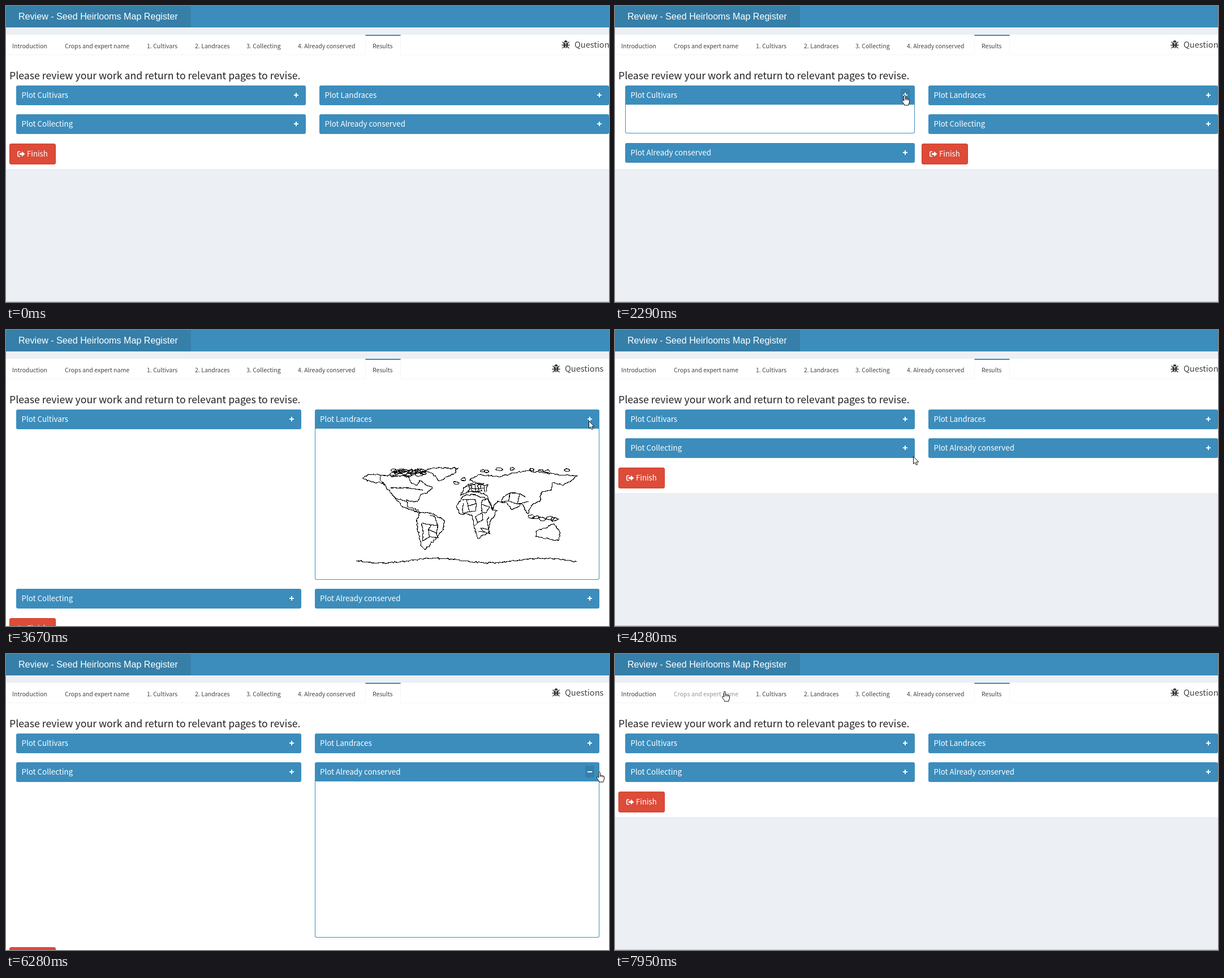
Write an HTML page that moves like this. It is 1066 by 525 pixels and loops after 8000 ms.

```html
<!DOCTYPE html>
<html lang="en">
<head>
<meta charset="utf-8">
<title>Results</title>
<style>
html, body { margin: 0; width: 100%; height: 100%; overflow: hidden; }
body { background: #ecf0f5; font-family: "Noto Sans CJK JP", "Noto Sans CJK SC", "Noto Sans CJK", "Open Sans", sans-serif; }
#stage { position: relative; width: 1066px; height: 525px; overflow: hidden; background: #ecf0f5; color: #444; white-space: nowrap; }
#stage > *, .abs { position: absolute; }
.bar { left: 0; top: 0; width: 100%; height: 38px; background: #3c8dbc; }
.brand { left: 0; top: 0; width: 305px; padding-left: 22px; height: 38px; background: #367fa9; color: #fff; font: 16.1px/37px "Liberation Sans", Arial, sans-serif; }
.edge { left: 0; top: 524px; width: 100%; height: 1px; background: #b9bec3; }
#page { left: 0; top: 51px; width: 1084px; }
.content { background: #fff; padding: 90px 0 8px 6px; line-height: 0; }
.tabs { left: 0; top: 0; width: 100%; height: 35px; border-bottom: 1px solid #f4f4f4; font-size: 10.55px; line-height: 39px; }
.tab { position: absolute; top: 0; }
.active { left: 635px; top: 0; width: 61px; height: 34px; border: solid #f4f4f4; border-width: 2px 1px 0; border-top-color: #3c8dbc; background: #fff; }
.help { left: 982px; top: 0; font-size: 14.6px; line-height: 34px; }
.help svg { position: absolute; left: 0; top: 9px; }
.help span { position: absolute; left: 23px; }
h3 { left: 6px; top: 56px; margin: 0; font-size: 17.72px; font-weight: 400; line-height: 30px; color: #222; }
#row { white-space: normal; }
.col { float: left; box-sizing: border-box; width: 50%; padding: 0 12px 16px; }
.box { position: relative; background: #3c8dbc; border-radius: 3px; padding: 0 1px 1px; overflow: hidden; white-space: nowrap; }
.head { height: 34px; padding-left: 8.5px; color: #fff; font-size: 13.35px; line-height: 33px; }
.tool { position: absolute; right: 9px; top: 6px; width: 16px; height: 21px; border-radius: 2px; }
.tool.hover { background: #367fa9; }
.tool::before, .tool::after { content: ""; position: absolute; background: #fff; }
.tool::before { left: 4px; top: 10px; width: 8px; height: 2px; }
.tool::after { left: 7px; top: 7px; width: 2px; height: 8px; }
.tool.minus::after { display: none; }
.body { position: relative; height: 0; background: #fff; overflow: hidden; border-radius: 0 0 2px 2px; }
.body svg { position: absolute; left: 72px; top: 67px; overflow: visible; }
.finish { display: inline-block; position: relative; vertical-align: top; box-sizing: border-box; width: 82px; height: 37px; margin-top: 1px; padding-left: 30px; background: #dd4b39; border: 1px solid #d73925; border-radius: 3px; color: #fff; font-size: 13.2px; line-height: 34px; white-space: nowrap; }
.finish svg { position: absolute; left: 13px; top: 12px; }
#cursor { left: 0; top: 0; overflow: visible; }
</style>
</head>
<body>
<div id="stage">
  <div class="edge"></div>
  <div class="bar"></div>
  <div class="brand">Review - Seed Heirlooms Map Register</div>
  <div id="page">
    <div class="content">
      <div class="abs tabs"></div>
      <div class="abs active"></div>
      <div class="abs tabs" id="labels" style="border-color:transparent"></div>
      <div class="abs help" id="help">
        <svg width="15" height="16" fill="#333" stroke="#333">
          <path d="M4.5 4.5a3 3.6 0 0 1 6 0z" stroke="none"/>
          <path d="M3.5 5.5h3.4v9.5q-3.500-1-3.400-9.500zM8.100 5.500h3.400q.1 8.500-3.400 9.500z" stroke="none"/>
          <path d="M.3 9.500h14.400M1.500 3.500l3 3M13.500 3.500l-3 3M1.500 15l3-3M13.500 15l-3-3" fill="none" stroke-width="1.300"/>
        </svg>
        <span>Questions</span>
      </div>
      <h3 class="abs">Please review your work and return to relevant pages to revise.</h3>
      <div id="row"><div class="finish"><svg width="14" height="11" fill="none" stroke="#fff">
        <path d="M5 1.200H2.500Q.9 1.200.9 2.800V8.200Q.9 9.800 2.500 9.800H5" stroke-width="1.600"/>
        <path d="M4 3.700h4V.8l5.500 4.700L8 10.200V7.300H4z" fill="#fff" stroke="none"/>
      </svg>Finish</div></div>
    </div>
  </div>
  <svg id="cursor" width="20" height="22" stroke="#111" fill="#fff" stroke-linejoin="round">
    <path id="arrow" d="M.5.500V13.500L3.500 10.800 5.500 15.500 7.700 14.500 5.700 10H9.800z"/>
    <g id="hand">
      <path d="M-1.300 9V1.500Q-1.300.3 0 .3T1.300 1.500V6Q3.500 5 3.800 6.700 5.800 5.800 6.200 7.400 8.500 6.800 8.500 9V12Q8.500 14 7 16V18H-.5V16.500Q-2.500 14-4.300 11.300-5 9.500-3.700 9-2.500 8.700-1.300 10.500z"/>
      <path d="M1.300 6V9M3.800 6.700V9.300M6.200 7.400V9.600" fill="none"/>
    </g>
  </svg>
</div>
<script>
const $ = id => document.getElementById(id);
const LOOP = 8000, SLIDE = 400, FULL = 346;

// Map: a few corner points per landmass, roughened with seeded jitter.
let seed = 7;
const rnd = () => (seed = (seed * 16807) % 2147483647) / 2147483647;
const jit = a => (rnd() - .5) * a;
const at = (x, y) => x.toFixed(1) + " " + y.toFixed(1);

function rough(pts, amount) {
  let d = "M" + at(...pts[0]);
  for (let i = 1; i < pts.length; i++) {
    const [x0, y0] = pts[i - 1], [x1, y1] = pts[i];
    const n = Math.ceil(Math.hypot(x1 - x0, y1 - y0) / 3);
    for (let k = 1; k < n; k++)
      d += "L" + at(x0 + (x1 - x0) * k / n + jit(amount), y0 + (y1 - y0) * k / n + jit(amount));
    d += "L" + at(x1, y1);
  }
  return d;
}

function land(text, amount = 3) {
  const pts = text.split(" ").map(p => p.split(",").map(Number));
  return rough([...pts, pts[0]], amount) + "z";
}

// Small islands spread evenly along a strip
function islands(count, x, y, w, h, r) {
  let d = "";
  for (let i = 0; i < count; i++) {
    const cx = x + w * (i + rnd()) / count, cy = y + rnd() * h, ring = [];
    for (let a = 0; a < 6; a++) {
      const q = r * (.5 + rnd() * .7);
      ring.push([cx + q * 1.4 * Math.cos(a), cy + q * .7 * Math.sin(a)]);
    }
    d += rough(ring, 1) + "z";
  }
  return d;
}

// Country borders: an irregular mesh with some edges left out
function mesh(x, y, cols, rows, step) {
  const grid = Array.from({ length: rows }, (_, r) => Array.from({ length: cols }, (_, c) =>
    [x + c * step + jit(step * .7), y + r * step + jit(step * .7)]));
  let d = "";
  grid.forEach((line, r) => line.forEach((p, c) => {
    for (const q of [line[c + 1], grid[r + 1]?.[c]])
      if (q && rnd() < .8) d += rough([p, q], 1.2);
  }));
  return d;
}

const iceEdge = Array.from({ length: 40 }, (_, i) => [i * 10, 167 + 4 * Math.sin(i / 3)]);
const world = [
  "12,21 22,14 92,18 98,30 107,34 112,25 135,39 113,53 108,63 90,59 92,72 105,75 112,82 82,72 60,46 48,29 28,28",
  "112,82 132,82 157,97 152,114 122,148 114,140 107,98",
  "116,9 135,3 180,3 172,14 147,26 134,12",
  "189,52 206,50 232,57 241,77 250,78 237,97 233,118 215,128 204,86 183,84 177,70",
  "185,51 190,38 204,32 226,30 213,29 201,24 215,15 250,18 300,8 390,17 366,34 348,28 346,41 327,47 325,62 309,70 303,84 293,66 276,77 267,65 250,62 241,77 232,52 206,43",
  "318,115 350,102 361,118 357,132 318,124"
].map(s => land(s)).join("")
  + rough([[43, 15], [43, 25], [52, 33]], 1) + rough([[61, 38], [91, 38], [118, 42]], .6) + rough([[68, 56], [89, 62]], 2)
  + islands(20, 64, 6, 58, 10, 5) + islands(8, 208, 4, 165, 6, 4) + islands(2, 172, 21, 22, 10, 4) + islands(5, 300, 87, 56, 10, 5)
  + mesh(199, 33, 7, 3, 5.5) + mesh(188, 58, 5, 3, 11) + mesh(212, 86, 3, 4, 11) + mesh(258, 51, 4, 2, 15) + mesh(118, 90, 3, 4, 13)
  + rough(iceEdge, 3);
const green = land("61,34 76,37 87,31 99,34 93,46 83,58 61,47", 1);
const orange = land("245,36 268,31 290,39 324,39 310,49 264,51 250,47", 3) + land("234,49 247,52 259,70 240,64", 3);

// x, y: centre of the panel's fold button
const panels = [
  { name: "Cultivars", x: 512, y: 158, open: 1559, close: 1990 },
  { name: "Landraces", x: 1049, y: 158, open: 3061, close: 3544 },
  { name: "Collecting", x: 512, y: 209, open: 4690, close: 5133, area: green, color: "#0f0" },
  { name: "Already conserved", x: 1049, y: 209, open: 6000, close: 6514, area: orange, color: "#ffa500" }
];
const row = $("row"), finish = row.firstElementChild;
for (const p of panels) {
  const col = document.createElement("div");
  col.className = "col";
  col.innerHTML = `<div class="box"><div class="head">Plot ${p.name}</div><div class="tool"></div>
    <div class="body"><svg width="390" height="190" stroke="#000" stroke-width="1.2" shape-rendering="crispEdges">
    <path d="${world}" fill="none"/><path d="${p.area || ""}" fill="${p.color || "none"}"/></svg></div></div>`;
  row.insertBefore(col, finish);
  p.tool = col.querySelector(".tool");
  p.body = col.querySelector(".body");
  p.map = col.querySelector("svg");
}

const tabs = Object.entries({
  "Introduction": 11, "Crops and expert name": 104, "1. Cultivars": 249, "2. Landraces": 334,
  "3. Collecting": 425, "4. Already conserved": 516, "Results": 648
}).map(([text, x]) => {
  const el = document.createElement("span");
  el.className = "tab";
  el.textContent = text;
  el.style.left = x + "px";
  return $("labels").appendChild(el);
});

// Cursor moves: start time, end time, goal x, goal y
const moves = [
  [70, 840, 525, 155], [920, 1100, 512, 158], [2330, 2930, 1052, 158], [3580, 4280, 527, 224], [4280, 4580, 512, 209],
  [5130, 5380, 926, 213], [5380, 5880, 1049, 209], [6560, 6740, 1034, 208], [6740, 7490, 437, 163], [7640, 7880, 194, 66]
];

const swing = u => .5 - Math.cos(Math.PI * Math.min(1, Math.max(0, u))) / 2;

function cursorAt(t) {
  let x = 914, y = 481;
  for (const [from, to, gx, gy] of moves) {
    const u = swing((t - from) / (to - from));
    x += (gx - x) * u;
    y += (gy - y) * u;
  }
  return [Math.round(x), Math.round(y)];
}

function draw(t) {
  const [x, y] = cursorAt(t);
  const onTab = y < 80 && x > 104 && x < 218;
  let hand = onTab;

  for (const p of panels) {
    const h = FULL * (swing((t - p.open) / SLIDE) - swing((t - p.close) / SLIDE));
    const hover = Math.abs(x - p.x) < 17 && Math.abs(y - p.y) < 12;
    p.body.style.height = Math.round(h) + "px";
    p.map.style.display = t >= p.open + 300 ? "" : "none";
    p.tool.classList.toggle("minus", t >= p.open && t < p.close);
    p.tool.classList.toggle("hover", hover);
    hand = hand || hover;
  }

  // A page taller than the stage gets a 17px scrollbar outside the view.
  row.style.width = "1072px";
  const bar = $("page").offsetHeight > 474 ? 17 : 0;
  row.style.width = 1072 - bar + "px";
  $("help").style.left = 982 - bar + "px";

  tabs[1].style.color = onTab ? "#999" : "";
  $("cursor").style.display = t < 70 ? "none" : "";
  $("cursor").style.transform = `translate(${x}px, ${y}px)`;
  $("hand").style.display = hand ? "" : "none";
  $("arrow").style.display = hand ? "none" : "";
}

const start = performance.now();
function tick() {
  draw((performance.now() - start) % LOOP);
  requestAnimationFrame(tick);
}
draw(0);
requestAnimationFrame(tick);
</script>
</body>
</html>
```
